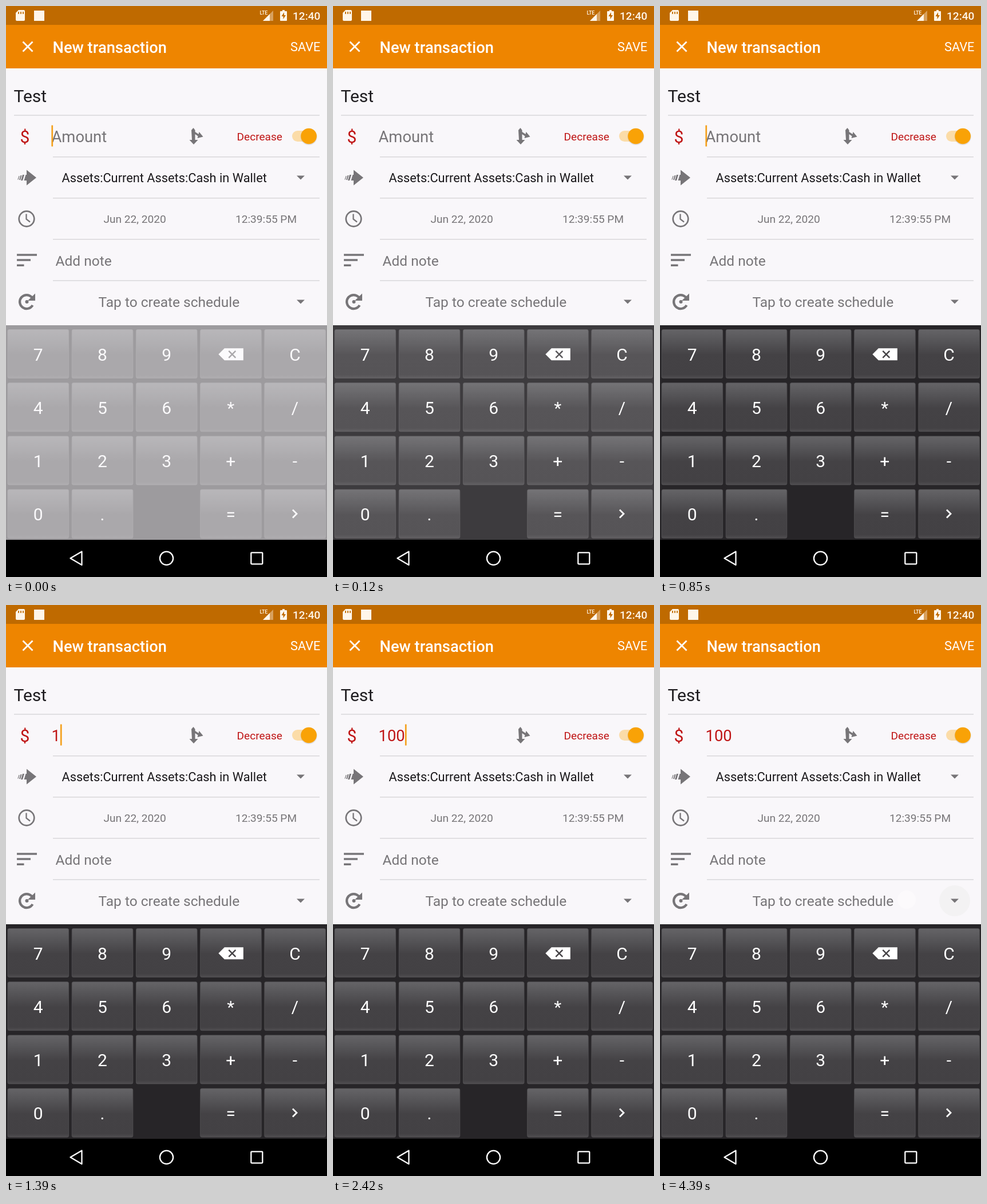
Recreate the animation shown at these times as an HTML page. Size 561x998 px, loop 4420 ms.

```html
<!DOCTYPE html>
<html lang="en">
<head>
<meta charset="utf-8">
<title>New transaction</title>
<style>
  html, body { margin: 0; width: 100%; height: 100%; overflow: hidden; background: #000; }
  svg { display: block; width: 561px; height: 998px; font-family: Roboto, "Liberation Sans", sans-serif; }
  .s { font-size: 19.1px; }
  .m { font-size: 21.8px; }
  .l { font-size: 24.5px; }
  .xl { font-size: 27.4px; }
  .xxl { font-size: 30px; }
  .grey { fill: #777578; }
  .red { fill: #bf1515; }
  .line { fill: none; stroke: #fff; }
</style>
</head>
<body>
<svg viewBox="0 0 561 998">
  <defs>
    <linearGradient id="key" x2="0" y2="1">
      <stop offset="0" stop-color="#656467"/>
      <stop offset=".25" stop-color="#555457"/>
      <stop offset=".52" stop-color="#444245"/>
      <stop offset=".93" stop-color="#434144"/>
      <stop offset="1" stop-color="#504e51"/>
    </linearGradient>
  </defs>
  <rect width="561" height="998" fill="#f9f7fa"/>

  <!-- status bar -->
  <rect width="561" height="33" fill="#bf6a00"/>
  <g fill="#fff6ea">
    <path d="M22 7h9q2 0 2 2v15q0 2-2 2H19q-2 0-2-2V12z"/>
    <path d="M22 10v4M26 10v4M30 10v4" stroke="#bf6a00" stroke-width="1.8"/>
    <rect x="49" y="8" width="18" height="18"/>
    <text x="443.5" y="15" font-size="9" font-weight="500" letter-spacing="-.4">LTE</text>
    <path d="M467 8v18h-18z" opacity=".4"/>
    <path d="M461 14v12h-12z"/>
    <path d="M483 7h4v2h3q1 0 1 1v15q0 1-1 1h-10q-1 0-1-1V10q0-1 1-1h3z"/>
    <path d="M486 11l-4.500 7h3v5l4.500-7h-3z" fill="#bf6a00"/>
    <text x="501" y="24" class="s" font-weight="500">12:40</text>
  </g>

  <!-- toolbar -->
  <rect y="33" width="561" height="76" fill="#ee8500"/>
  <path d="M29.500 62.500l17 17m0-17l-17 17" class="line" stroke-width="2.800"/>
  <g fill="#fff">
    <text x="81.500" y="81.500" font-size="27.300" font-weight="500">New transaction</text>
    <text x="497" y="79" class="m">SAVE</text>
  </g>

  <!-- form -->
  <path d="M14 191H548M82 263.700H548M82 335.700H548M82 407.700H548M82 480H548" stroke="#d9d7da" stroke-width="1.500"/>
  <text x="13.500" y="168" class="xxl" fill="#1f1d20">Test</text>

  <text x="33" y="239" class="xxl red" text-anchor="middle">$</text>
  <text id="amount" x="79.500" y="237.500" class="xl"></text>
  <rect id="cursor" y="208.500" width="2.700" height="37" fill="#f4a01c"/>
  <path class="grey" d="M324 217l3.500-4 3 4v3l6 4 1-4 7 8.500-10 2.500 1-3.500-5-3.500v10h5l-7.500 8-7.500-8h4.500z"/>
  <text x="403.500" y="234.500" class="s red">Decrease</text>
  <rect x="500" y="218" width="38" height="19" rx="9.500" fill="#fbdca8"/>
  <circle cx="529.200" cy="228.500" r="14.500" fill="#000" opacity=".1"/>
  <circle cx="529.200" cy="227.500" r="13.800" fill="#f9a206"/>

  <path class="grey" d="M36 286.500l17 13.500-17 13.500v-8.500h-4.500l3-10H36zM29 295h3l-3 10h-3zM25.500 296h2l-2.500 8h-2zM22.500 297h1.200l-2.200 6.500h-1.200z"/>
  <text x="97.500" y="307.500" class="m" fill="#1a181b">Assets:Current Assets:Cash in Wallet</text>

  <g fill="none" stroke="#777578">
    <circle cx="36" cy="372" r="13.300" stroke-width="2.700"/>
    <path d="M35.500 363.500v9l6.500 5" stroke-width="2.300"/>
    <path d="M19 435h35M19 444h24M19 453.200h12.500" stroke-width="3.400"/>
    <path d="M45 509a12 12 0 1 0 1.500 14" stroke-width="4.300"/>
  </g>
  <text x="170.500" y="379" class="s grey">Jun 22, 2020</text>
  <text x="401" y="379" class="s grey">12:39:55 PM</text>
  <text x="86.500" y="453.500" class="l grey">Add note</text>

  <circle cx="36.500" cy="517" r="3" class="grey"/>
  <path d="M51 502.500v12.500h-13z" class="grey"/>
  <text x="161.500" y="525.500" class="l grey">Tap to create schedule</text>
  <g id="touch" opacity="0">
    <circle cx="515" cy="517" r="27" fill="#f3f2f3"/>
    <circle cx="431" cy="515" r="16" fill="#fcfafc"/>
  </g>
  <path d="M508 296.500h14l-7 7zM508 513.500h14l-7 7z" class="grey"/>

  <g id="pad" fill="#fff" text-anchor="middle">
    <rect y="558" width="561" height="375" fill="#272528"/>
  </g>

  <!-- navigation bar -->
  <rect y="933" width="561" height="65"/>
  <g class="line" stroke-width="2.300">
    <path d="M132.500 953.500v23.500l-20-11.700z" stroke-linejoin="round"/>
    <circle cx="280.500" cy="965.300" r="11.600"/>
    <rect x="428.300" y="955.300" width="20" height="20" rx="1"/>
  </g>
</svg>
<script>
const LOOP = 4420;
const LABELS = ["789⌫C", "456*/", "123+-", "0. =>"];
const PRESSES = [["1", 1000, 1060], ["0", 1550, 1580], ["0", 2180, 2250]];
const CURSOR_ON = [[0, 90], [420, 940], [1060, 2060], [2250, 2760], [3240, 3790]];

const $ = id => document.getElementById(id);
const within = (t, a, b) => t >= a && t < b;

function add(tag, attrs, text = "") {
  const el = document.createElementNS("http://www.w3.org/2000/svg", tag);
  for (const name in attrs) el.setAttribute(name, attrs[name]);
  el.textContent = text;
  return $("pad").appendChild(el);
}

const glow = {};
LABELS.forEach((row, j) => [...row].forEach((label, i) => {
  if (label === " ") return;
  const x = 3 + 112.2 * i, y = 565.5 + 93.2 * j, cx = x + 53.2, cy = y + 43.3;
  const box = { x, y, width: 106.6, height: 85, rx: 2.5 };
  add("rect", { ...box, fill: "url(#key)", stroke: "#555356", "stroke-width": .8 });
  glow[label] = add("rect", { ...box, opacity: 0 });
  if (label === "⌫") {
    add("path", { d: `M${cx - 21.5} ${cy}l10.500-10.500h33v21h-33z` });
    add("path", { d: `M${cx - 3.5} ${cy - 6}l12 12m0-12l-12 12`, stroke: "#454346", "stroke-width": 2.4 });
  } else if (label === ">") {
    add("path", { d: `M${cx - 4} ${cy - 8}l7 7-7 7`, class: "line", "stroke-width": 2.8 });
  } else {
    add("text", { x: cx, y: cy + 10.7, class: "xxl" }, label);
  }
}));

function draw() {
  const t = performance.now() % LOOP;
  const step = Math.floor(t / 30) * 30;

  // keypad fades in, decelerating
  const rest = step < 180 ? .755 - .00354 * step : 0;
  $("pad").setAttribute("opacity", 1 - rest * rest);

  const typed = PRESSES.filter(p => t >= p[2]).map(p => p[0]).join("");
  $("amount").textContent = typed || "Amount";
  $("amount").setAttribute("class", typed ? "xl red" : "xl grey");
  $("cursor").setAttribute("x", 79.4 + 15.5 * typed.length);
  $("cursor").setAttribute("opacity", CURSOR_ON.some(([a, b]) => within(t, a, b)) ? 1 : 0);

  for (const key of ["0", "1"]) {
    const down = PRESSES.some(([k, a, b]) => k === key && within(t, a, b));
    glow[key].setAttribute("opacity", down ? .2 : 0);
  }

  $("touch").setAttribute("opacity", t < 4120 ? 0 : Math.min(1, (t - 4090) / 300));
  requestAnimationFrame(draw);
}
draw();
</script>
</body>
</html>
```
